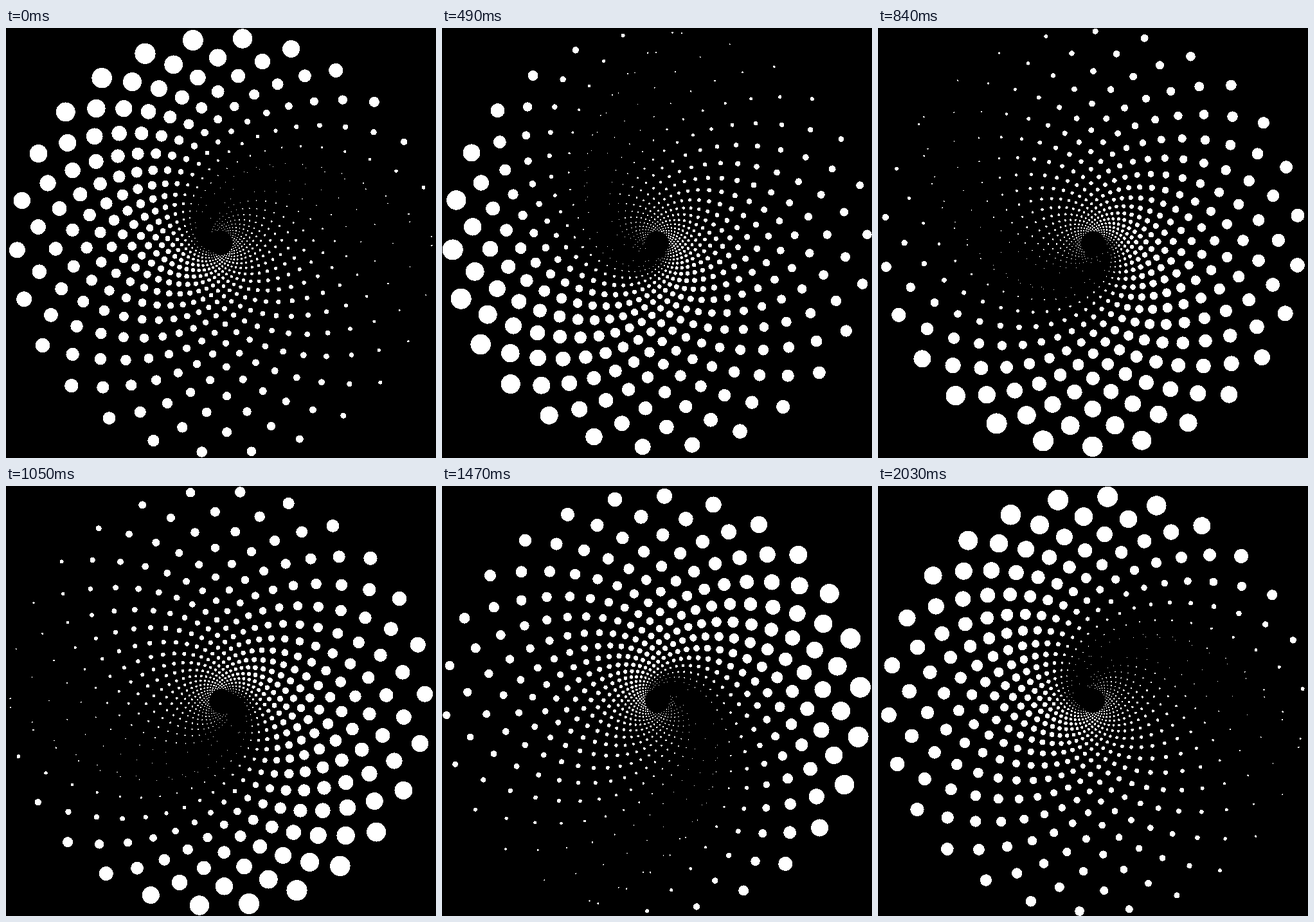
Write an HTML page that moves like this. It is 669x668 px and loops after 2.1 s.

```html
<!DOCTYPE html>
<html lang="en">
<head>
<meta charset="utf-8">
<title>Rotating dot spiral</title>
<style>
  html, body { margin: 0; width: 100%; height: 100%; overflow: hidden; background: #000; }
  svg { display: block; }
</style>
</head>
<body>
<svg width="669" height="668" viewBox="0 0 669 668" shape-rendering="crispEdges">
  <g id="spiral" fill="#fff"></g>
</svg>
<script>
const CX = 334.5, CY = 334;
const RINGS = 28, SHRINK = 0.9018, TWIST = 7.02 * Math.PI / 180;
const RADIUS = 322.6, STEP = 0.24;
const OFFSET = { x: 5.34, y: 3.88 };
const FRAME = 70, FRAMES = 30;

// Dot radii around the outermost ring, clockwise from the seam
const SIZES = [1.2, 1.1, 1.7, 3, 4.5, 6, 7.3, 8.3, 9.1, 9.9, 10.6, 11.3, 12, 12.5,
  13.2, 14, 15, 15.8, 16.1, 16, 15.2, 13.5, 11, 8, 5.2, 2.9, 1.5];

const spiral = document.getElementById('spiral');

function addDot(x, y, r) {
  const dot = document.createElementNS('http://www.w3.org/2000/svg', 'circle');
  dot.setAttribute('cx', x.toFixed(3));
  dot.setAttribute('cy', y.toFixed(3));
  dot.setAttribute('r', r.toFixed(3));
  spiral.append(dot);
}

// Each ring is the previous one shrunk and turned about the centre
for (let k = 0; k < RINGS; k++) {
  const scale = SHRINK ** k;
  const cos = scale * Math.cos(k * TWIST), sin = scale * Math.sin(k * TWIST);
  SIZES.forEach((size, j) => {
    const x = OFFSET.x + RADIUS * Math.cos(j * STEP);
    const y = OFFSET.y + RADIUS * Math.sin(j * STEP);
    addDot(x * cos + y * sin, y * cos - x * sin, size * scale);
  });
}

const start = performance.now();

function draw() {
  const elapsed = Math.max(0, performance.now() - start);
  const step = Math.floor(elapsed / FRAME) % FRAMES;
  spiral.setAttribute('transform', `translate(${CX} ${CY}) rotate(${-step * 360 / FRAMES})`);
  requestAnimationFrame(draw);
}
draw();
</script>
</body>
</html>
```
